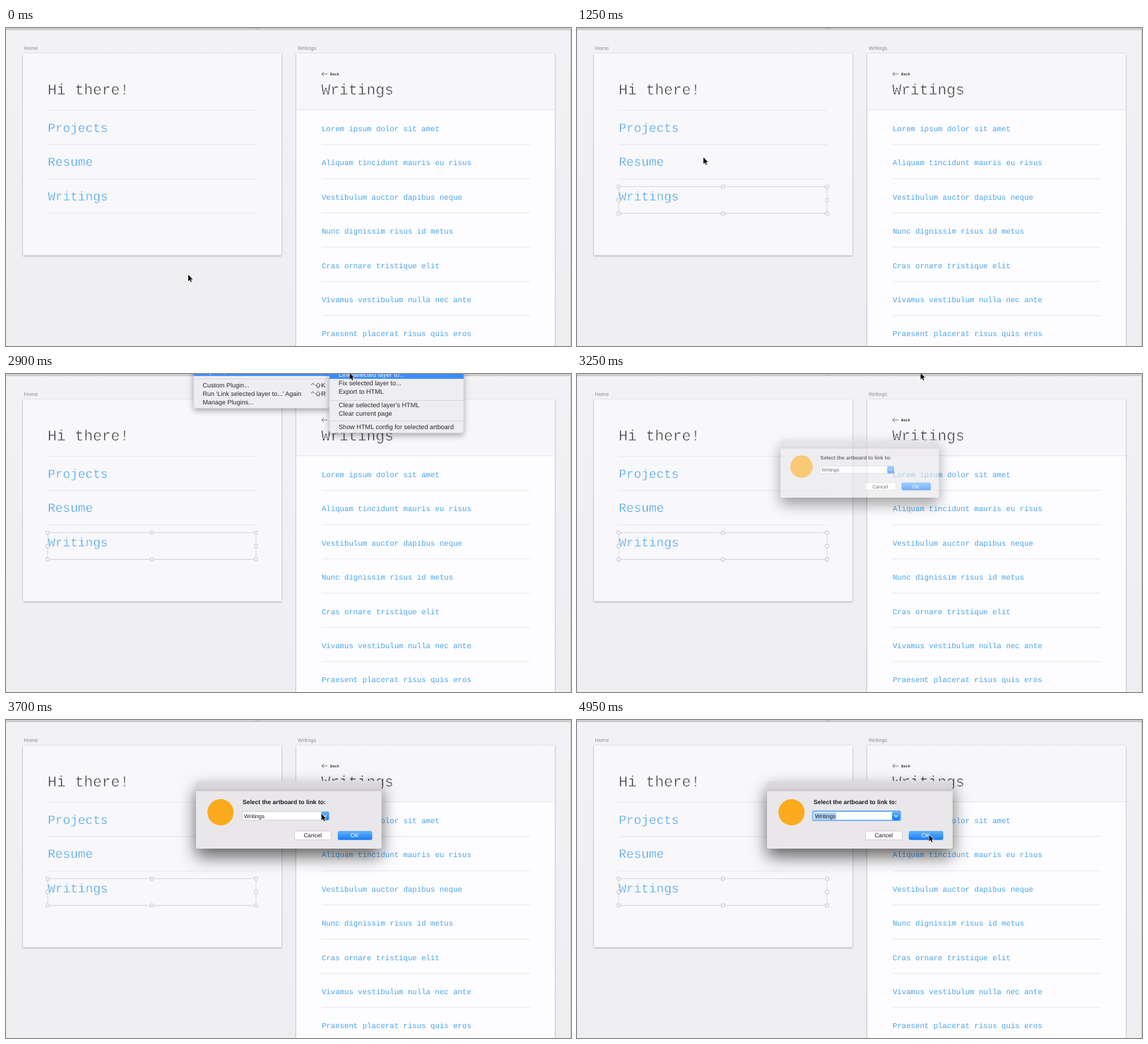
These frames come from a looping animation (800 px wide and 450 px high, 5 s). An HTML page:

```html
<!DOCTYPE html>
<html lang="en">
<head>
<meta charset="utf-8">
<title>Link a layer to an artboard</title>
<style>
html, body { margin: 0; width: 100%; height: 100%; overflow: hidden; background: #efeef1; }
svg { display: block; width: 800px; height: 450px; }
text { text-rendering: geometricPrecision; white-space: pre; font-family: "Liberation Sans", Arial, sans-serif; }
.mono { font-family: "Liberation Mono", "Courier New", monospace; }
.title { font-size: 21.33px; fill: #343436; stroke: #f7f6f9; stroke-width: .6px; }
.link { font-size: 17.78px; fill: #48a4ec; stroke: #f8f7fa; stroke-width: .4px; }
.item { font-size: 10.71px; fill: #4ba5ec; }
.label { font-size: 7.3px; fill: #8d8c90; }
.menu { font-size: 9px; fill: #2a2a2c; }
.sub { font-size: 9.15px; fill: #2a2a2c; }
.ui { font-size: 8.3px; fill: #1c1c1e; }
</style>
</head>
<body>
<svg viewBox="0 0 800 450" xmlns="http://www.w3.org/2000/svg">
  <defs>
    <filter id="paper" x="-5%" y="-5%" width="110%" height="110%">
      <feDropShadow dx="0" dy=".8" stdDeviation="1" flood-opacity=".4"/>
    </filter>
    <filter id="drop" x="-20%" y="-30%" width="140%" height="180%">
      <feDropShadow dx="0" dy="3" stdDeviation="4" flood-opacity=".34"/>
    </filter>
    <filter id="deep" x="-25%" y="-60%" width="150%" height="240%">
      <feDropShadow dx="0" dy="11.5" stdDeviation="11.5" flood-opacity=".6"/>
    </filter>
    <linearGradient id="wall" x2="0" y2="1">
      <stop stop-color="#f2f1f4"/><stop offset="1" stop-color="#eeedf0"/>
    </linearGradient>
    <linearGradient id="bar" x2="0" y2="1">
      <stop stop-color="#dfdddf"/><stop offset="1" stop-color="#d0ced0"/>
    </linearGradient>
    <linearGradient id="blue" x2="0" y2="1">
      <stop stop-color="#65b3fb"/><stop offset="1" stop-color="#147bf5"/>
    </linearGradient>
  </defs>
  <rect width="800" height="450" fill="url(#wall)"/>
  <rect width="800" height="2.6" fill="#d0cfd2"/>
  <rect y="2.2" width="800" height=".8" fill="#c0bfc2"/>
  <rect x="352" y=".6" width="8" height=".8" fill="#b2b1b4"/>
  <rect x="799" y="3" width="1" height="447" fill="#cdccd0"/>
  <g id="boards"></g>
  <g id="select"></g>
  <g id="menu"></g>
  <g id="sub"></g>
  <g id="dialog"></g>
  <path id="cursor" d="M0 0V9.2L2.1 7.3 3.5 10.6 5 9.9 3.6 6.7H6.5Z" fill="#0b0b0c" stroke="#fff" stroke-width="1.1" stroke-linejoin="round" paint-order="stroke"/>
</svg>
<script>
const LOOP = 5000, STEP = 50;
const $ = id => document.getElementById(id);
const rect = (x, y, w, h, fill, more = '') =>
  `<rect x="${x}" y="${y}" width="${w}" height="${h}" fill="${fill}" ${more}/>`;
const text = (x, y, cls, s, more = '') => `<text x="${x}" y="${y}" class="${cls}" ${more}>${s}</text>`;
const rule = (x, y, w, color = '#e8e7eb') => rect(x, y - .5, w, 1, color);
const path = (d, color, width) =>
  `<path d="${d}" fill="none" stroke="${color}" stroke-width="${width}"/>`;

function boards() {
  const links = ['Projects', 'Resume', 'Writings'];
  const items = ['Lorem ipsum dolor sit amet', 'Aliquam tincidunt mauris eu risus',
    'Vestibulum auctor dapibus neque', 'Nunc dignissim risus id metus',
    'Cras ornare tristique elit', 'Vivamus vestibulum nulla nec ante',
    'Praesent placerat risus quis eros'];
  const row = 48.4;
  let s = text(25.5, 31.3, 'label', 'Home') + text(413, 31.3, 'label', 'Writings');
  s += rect(24, 36, 366, 285.5, '#f8f7fa', 'filter="url(#paper)"');
  s += rect(411, 36, 366, 430, '#fdfcfe', 'filter="url(#paper)"');
  s += rect(411, 36, 366, 79.5, '#f7f6f9') + rule(411, 115.8, 366, '#e4e3e7');
  s += text(59, 94, 'mono title', 'Hi there!') + text(446.5, 94, 'mono title', 'Writings');
  s += path('M455 65H447M450 62L447 65 450 68', '#454547', .7);
  s += text(459, 66.6, 'mono', 'Back', 'font-size="5.4" font-weight="bold" fill="#39393b"');
  for (let i = 0; i < 4; i++) s += rule(59, 116.4 + i * 48.6, 295);
  links.forEach((name, i) => s += text(59.2, 146.6 + i * 48.7, 'mono link', name));
  items.forEach((name, i) => {
    s += text(446.9, 146 + i * row, 'mono item', name);
    if (i) s += rule(447, 116.5 + i * row, 295);
  });
  return s;
}

function selection() {
  let s = rect(59, 224.5, 295, 38, 'none', 'stroke="#d3d2d6" stroke-width=".8"');
  for (const x of [59, 206.6, 354])
    for (const y of [224.5, 243.5, 262.5])
      if (x !== 206.6 || y !== 243.5)
        s += rect(x - 2.2, y - 2.2, 4.4, 4.4, '#fff', 'rx=".5" stroke="#b7b6ba" stroke-width=".8"');
  return s;
}

const panel = (x, w, bottom) =>
  rect(x, -20, w, bottom + 20, '#eeedef', 'rx="3.5" stroke="#c3c2c5" stroke-width=".5" filter="url(#drop)"');

function menu() {
  let s = panel(265.5, 193, 48.5);
  s += `<g id="menuHot">${rect(265.5, -5, 193, 7.8, '#3b8cf6')}` +
    path('M288 .2q2 1.2 3 -.4M310 0v1', '#fff', .8) + '</g>';
  s += rule(265.5, 7, 193, '#dad9dc');
  ['Custom Plugin...', 'Run ‘Link selected layer to...’ Again', 'Manage Plugins...']
    .forEach((name, i) => s += text(278.6, 19.4 + i * 11.9, 'menu', name));
  ['K', 'R'].forEach((key, i) => {
    const y = 19.4 + i * 11.9;
    s += path(`M432 ${y - 3.8}l2.4 -2.6 2.4 2.6`, '#2a2a2c', .8);
    s += path(`M442 ${y - 6.6}l3.4 3.4h-1.8v2.8h-3.2v-2.8h-1.8z`, '#2a2a2c', .7);
    s += text(446.2, y, 'menu', key);
  });
  return s;
}

function submenu() {
  let s = panel(458, 190, 83.5);
  s += `<g id="subHot">${rect(458, -5, 190, 11.8, '#3b8cf6')}</g>`;
  s += text(471, 4.2, 'sub', 'Link selected layer to...', 'id="subTop"');
  const rows = [['Fix selected layer to...', 16], ['Export to HTML', 27.8],
    ["Clear selected layer's HTML", 47], ['Clear current page', 59],
    ['Show HTML config for selected artboard', 78.2]];
  for (const [name, y] of rows) s += text(471, y, 'sub', name);
  return s + rule(458, 37.5, 190, '#d8d7da') + rule(458, 66.4, 190, '#d8d7da');
}

function dialog() {
  const mid = 'text-anchor="middle"';
  let s = rect(269, 86, 262.5, 96, '#e9e7e9', 'rx="3.5" filter="url(#deep)"');
  s += '<path d="M269 99.8V89.5q0 -3.5 3.5 -3.5H528q3.5 0 3.5 3.5V99.8Z" fill="url(#bar)"/>';
  s += rule(269, 99.8, 262.5, '#b9b7b9');
  s += '<circle cx="303.8" cy="130.6" r="18.6" fill="#fbab1d"/>';
  s += text(335, 118.8, 'ui', 'Select the artboard to link to:', 'font-weight="bold" style="font-size:8.53px"');
  s += rect(334.7, 129.7, 122, 12, '#fff', 'rx="1" stroke="#bdbbbd" stroke-width=".6"');
  s += `<g id="focus">${rect(334, 129, 124, 13.2, '#fff', 'rx="1.5" stroke="#6fb0f2" stroke-width="1.8"')}` +
    rect(336, 131, 31, 10, '#acd1fb') + '</g>';
  s += text(337, 139.2, 'ui', 'Writings', 'style="font-size:8.1px"');
  s += rect(446, 129.6, 11.4, 12.2, 'url(#blue)', 'rx="2"') +
    path('M449.4 134.6l2.3 2.4 2.3 -2.4', '#fff', 1.1);
  s += rect(408.5, 157.2, 52, 12.4, '#fff', 'rx="2.5" stroke="#c6c4c6" stroke-width=".7"');
  s += text(434.3, 166.4, 'ui', 'Cancel', mid);
  s += rect(469.7, 157, 48.8, 12.8, 'url(#blue)', 'rx="2.5"');
  return s + text(493.8, 166.4, 'ui', 'OK', mid + ' style="fill:#fff"');
}

$('boards').innerHTML = boards();
$('select').innerHTML = selection();
$('menu').innerHTML = menu();
$('sub').innerHTML = submenu();
$('dialog').innerHTML = dialog();

// Pointer stops: time, x, y
const stops = [[0, 258, 349], [150, 258, 349], [750, 174, 244], [1100, 174, 244],
  [1250, 179, 183], [1550, 272, -16], [2400, 400, -16], [2650, 486.5, -1.5], [3350, 486.5, -1.5],
  [3650, 446.6, 132.5], [4400, 446.6, 132.5], [4800, 498.5, 162.5], [LOOP, 498.5, 162.5]];
const ease = p => p * p * (3 - 2 * p);
const clamp = p => Math.max(0, Math.min(1, p));

function pointer(t) {
  const i = stops.findIndex(s => s[0] > t);
  const [t0, x0, y0] = stops[i - 1], [t1, x1, y1] = stops[i];
  const p = ease((t - t0) / (t1 - t0));
  return [x0 + (x1 - x0) * p, y0 + (y1 - y0) * p];
}

const show = (id, on) => $(id).style.display = on ? '' : 'none';

function draw(t) {
  show('select', t >= 850);
  show('menu', t >= 1650 && t < 3050);
  show('menuHot', t >= 1900);
  show('sub', t >= 2350 && t < 3050);
  show('subHot', t >= 2600);
  $('subTop').style.fill = t >= 2600 ? '#fff' : '';
  show('focus', t >= 4150);

  const p = clamp((t - 3150) / 200);
  show('dialog', p > 0);
  $('dialog').setAttribute('opacity', Math.min(1, p * 1.2));
  $('dialog').setAttribute('transform', `translate(400 134) scale(${.705 + .295 * p}) translate(-400 -134)`);
  $('cursor').setAttribute('transform', `translate(${pointer(t)})`);
}

const start = performance.now();
function tick() {
  const t = (performance.now() - start) % LOOP;
  draw(Math.floor(t / STEP) * STEP);
  requestAnimationFrame(tick);
}
draw(0);
requestAnimationFrame(tick);
</script>
</body>
</html>
```
